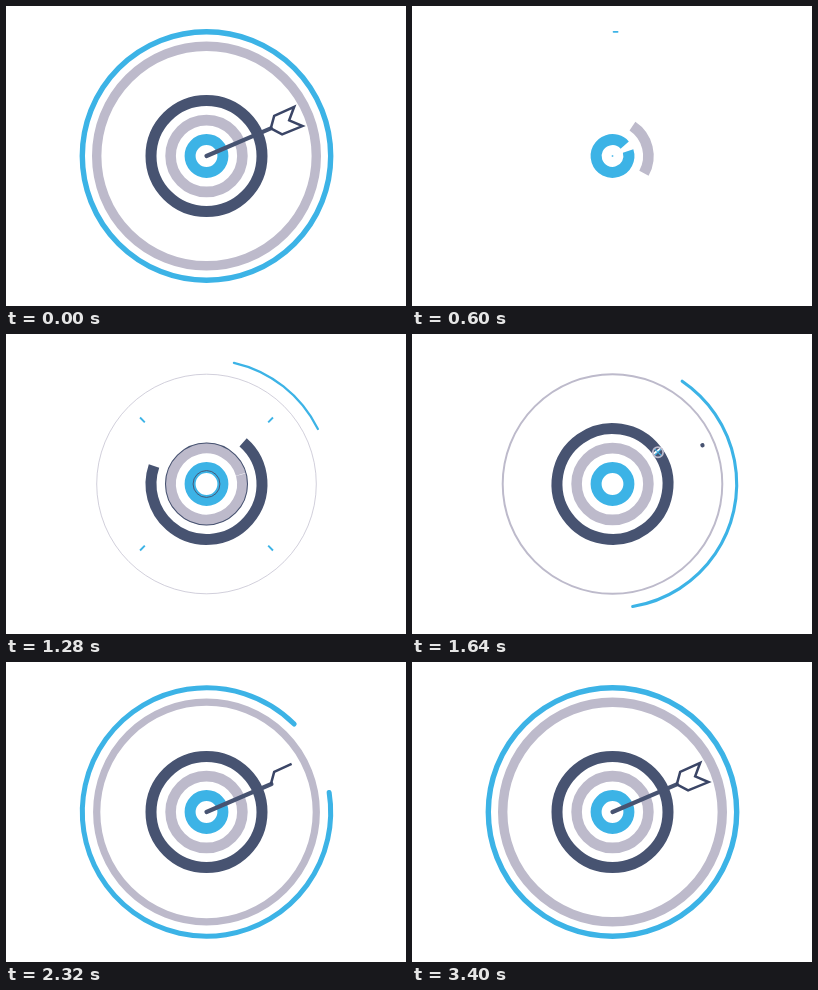
Animation of 400x300 px, one loop 5720 ms. Source, as an HTML page with a canvas:

```html
<!DOCTYPE html>
<html lang="en">
<head>
<meta charset="utf-8">
<title>Target</title>
<style>
  html, body { margin: 0; width: 100%; height: 100%; overflow: hidden; background: #fff; }
  canvas { display: block; width: 400px; height: 300px; }
</style>
</head>
<body>
<canvas id="stage"></canvas>
<script>
const LOOP = 5720, STEP = 40, END = 3400;
const BLUE = '#3cb3e6', GRAY = '#bdbacb', DARK = '#475371', INK = '#3a4566';
const CX = 200.5, CY = 150, RAD = Math.PI / 180;
const AIM = -23.3;

const canvas = document.getElementById('stage');
const dpr = window.devicePixelRatio || 1;
canvas.width = 400 * dpr;
canvas.height = 300 * dpr;
const ctx = canvas.getContext('2d');

const span = (t, from, to) => Math.min(1, Math.max(0, (t - from) / (to - from)));
const mix = (a, b, p) => a + (b - a) * p;
const out = u => 1 - (1 - u) ** 3;
const bezier = (a, b, s) => 3 * (1 - s) ** 2 * s * a + 3 * (1 - s) * s * s * b + s ** 3;

// cubic-bezier(.645, .045, .355, 1)
function inOut(u) {
  if (u <= 0 || u >= 1) return u;
  let low = 0, high = 1;
  for (let i = 0; i < 20; i++) {
    const mid = (low + high) / 2;
    if (bezier(0.645, 0.355, mid) < u) low = mid; else high = mid;
  }
  return bezier(0.045, 1, low);
}
const ease = (t, from, to) => inOut(span(t, from, to));

function stroke(color, width, cap = 'butt') {
  ctx.strokeStyle = color;
  ctx.lineWidth = width;
  ctx.lineCap = cap;
  ctx.stroke();
}

function circle(x, y, r, width, color) {
  if (r <= 0 || width <= 0.02) return;
  ctx.beginPath();
  ctx.arc(x, y, r, 0, 2 * Math.PI);
  stroke(color, width);
}

// Arc that lengthens clockwise while its start also turns.
function growingArc(p, r, width, color, from, to, cap) {
  if (p <= 0) return;
  if (p >= 1) return circle(CX, CY, r, width, color);
  const start = mix(from, to, p) * RAD;
  ctx.beginPath();
  ctx.arc(CX, CY, r, start, start + 2 * Math.PI * p);
  stroke(color, width, cap);
}

function ray(x, y, angle, tail, head, width, color, cap) {
  if (head - tail < 0.05) return;
  const c = Math.cos(angle * RAD), s = Math.sin(angle * RAD);
  ctx.beginPath();
  ctx.moveTo(x + c * tail, y + s * tail);
  ctx.lineTo(x + c * head, y + s * head);
  stroke(color, width, cap);
}

function rays(x, y, count, turn, tail, head, width, color, cap) {
  for (let i = 0; i < count; i++) {
    ray(x, y, turn + i * 360 / count, tail, head, width, color, cap);
  }
}

// Thinning ring that opens from a point.
function ripple(t, from, to, x, y, r, width, color) {
  const u = span(t, from, to);
  if (u > 0 && u < 1) circle(x, y, r * out(u), width * (1 - u), color);
}

function spark(t, start, angle, r, turn) {
  const x = CX + r * Math.cos(angle * RAD), y = CY + r * Math.sin(angle * RAD);
  const head = 30 * ease(t, start, start + 500);
  const tail = 30 * ease(t, start + 130, start + 630);
  rays(x, y, 4, turn, tail, head, 1.2, BLUE);
  ripple(t, start + 100, start + 630, x, y, 14, 2, GRAY);
}

function arrow(t) {
  if (t < 1640) return;
  const tip = mix(98, 0, ease(t, 1630, 2330));
  const end = mix(98, 70, ease(t, 1900, 2400));
  ray(CX, CY, AIM, tip, end, 4.2, DARK, 'round');

  const p = ease(t, 2120, 2600);
  if (p <= 0) return;
  ctx.save();
  ctx.translate(CX, CY);
  ctx.rotate(AIM * RAD);
  ctx.beginPath();
  ctx.moveTo(70, 0);
  [[78, -10], [100, -10.5], [90, 0], [100, 10.5], [78, 10]].forEach(q => ctx.lineTo(...q));
  ctx.closePath();
  if (p < 1) ctx.setLineDash([104 * p, 110]);
  stroke(INK, 2.5);
  ctx.restore();
}

function draw(t) {
  ctx.setTransform(dpr, 0, 0, dpr, 0, 0);
  ctx.fillStyle = '#fff';
  ctx.fillRect(0, 0, 400, 300);

  circle(CX, CY, 109.8, 9.4 * ease(t, 640, 3400), GRAY);
  const rim = ease(t, 475, 3075);
  growingArc(rim, 124.2, mix(1.7, 5.4, rim), BLUE, -90, 0, 'round');

  growingArc(ease(t, 150, 1338), 35.9, 10.6, GRAY, -69, -15);
  growingArc(ease(t, 695, 1727), 55.5, 11, DARK, -79, -35);
  growingArc(ease(t, 40, 783), 16.4, 11, BLUE, -60, -15);

  rays(CX, CY, 8, 0, mix(36, 118, ease(t, 2600, 3320)),
    mix(36, 118, ease(t, 2380, 3085)), 4.5, GRAY, 'round');

  ripple(t, 640, 1320, CX, CY, 41, 18, DARK);
  ripple(t, 920, 1600, CX, CY, 15, 2, DARK);
  rays(CX, CY, 4, 45, 94 * ease(t, 794, 1446), 94 * ease(t, 573, 1225), 1.9, BLUE);

  spark(t, 1465, -35, 55.5, 45);
  spark(t, 2760, 0, 125, 0);
  arrow(t);
}

const origin = performance.now();
function frame() {
  const t = Math.floor(((performance.now() - origin) % LOOP) / STEP) * STEP;
  draw(t < STEP ? END : Math.min(t, END));
  requestAnimationFrame(frame);
}
frame();
</script>
</body>
</html>
```
